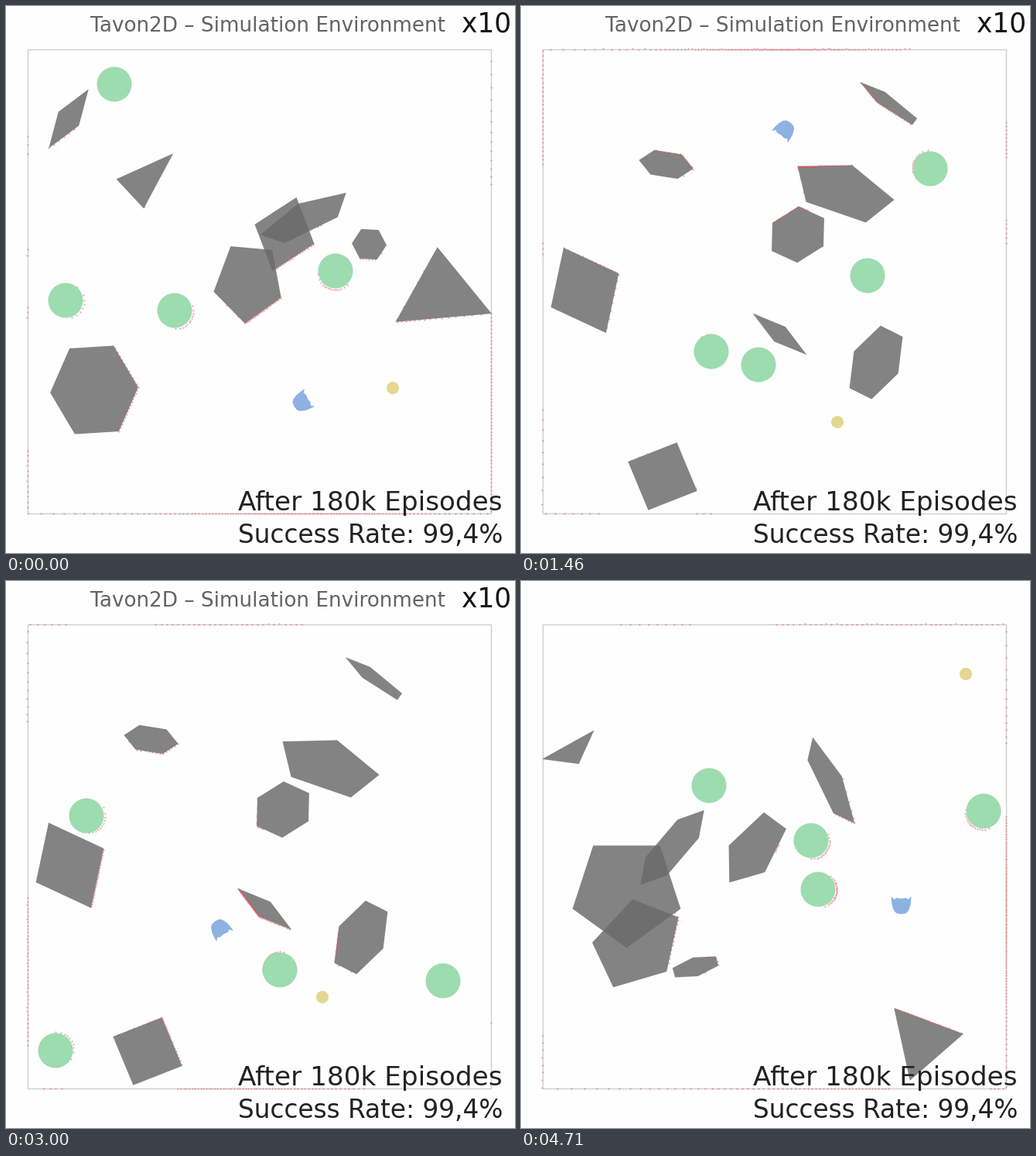
A matplotlib script that plays this animation: 658 by 706 pixels, repeating every 4750 ms.

```python
import numpy as np
import matplotlib.pyplot as plt
from matplotlib.animation import FuncAnimation
from matplotlib.collections import PolyCollection
from matplotlib.patches import Circle, Polygon, Rectangle

W, H, DPI = 658, 706, 64
PX = 72 / DPI                  # points per pixel
FRAMES, STEP = 190, 25         # 4750 ms
LEFT, TOP, RIGHT, BOTTOM = 27.5, 55.5, 627, 654.5
R = 22.5                       # radius of the moving discs
SPEED = 0.21                   # disc speed, px per ms
LAG = 8                        # the scanner sees the discs this late, ms
TITLE_END = 4670


def rotate(points, deg):
    c, s = np.cos(np.radians(deg)), np.sin(np.radians(deg))
    return points @ np.array([(c, s), (-s, c)])


def ngon(n, x, y, a, b, tilt):
    """Regular n-gon stretched to half-axes a and b, then turned."""
    k = 2 * np.pi * np.arange(n) / n
    return rotate(np.stack([a * np.cos(k), b * np.sin(k)], axis=1), tilt) + (x, y)


def robot_pose(path, t):
    path = np.array(path, float)
    return [np.interp(t, path[:, 0], path[:, c]) for c in (1, 2, 3)]


def scene(start, goal, path, times, layouts, shapes):
    """path rows: time, x, y, heading; layouts: disc centres at each of times."""
    shapes = [ngon(*s) for s in shapes]
    walls = np.array([(LEFT, TOP), (RIGHT, TOP), (RIGHT, BOTTOM), (LEFT, BOTTOM)])
    segs = np.concatenate([np.stack([s, np.roll(s, -1, axis=0)], axis=1)
                           for s in shapes + [walls]])
    layouts = np.array(layouts, float)
    if len(times) == 1:        # discs drift straight away from the robot
        away = layouts[0] - robot_pose(path, times[0])[:2]
        away /= np.linalg.norm(away, axis=1, keepdims=True)
        times = [times[0], times[0] + 1000]
        layouts = np.stack([layouts[0], layouts[0] + 1000 * SPEED * away])
    return dict(start=start, goal=goal, path=path, times=times,
                layouts=layouts, shapes=shapes, segs=segs)


# Shapes: corners, centre x, centre y, two half-axes, tilt
SCENES = [
    scene(0, (500, 493),
          [(0, 383, 511, -30), (320, 492, 494, 0)],
          [0], [[(140, 101), (77, 380), (218, 393), (426, 342)]],
          [(4, 81, 145.5, 46, 16, -56), (3, 179, 225, 51, 30, -43),
           (4, 360, 294.5, 40.5, 50, 18), (5, 387, 274, 21, 65, -116),
           (5, 313.5, 356, 54, 46, 95), (6, 469.5, 307.5, 22.5, 22, 3),
           (3, 563, 372, 61, 72, -95), (6, 114, 495.5, 57, 64, -3.5)]),
    scene(320, (382, 282),
          [(320, 560, 440, -150), (700, 441, 366, -132), (990, 386, 288, -125)],
          [700], [[(603, 83), (374, 226), (457, 515), (545, 602)]],
          [(6, 326, 119, 14, 35, -93), (4, 139, 161, 34, 31.5, -75),
           (6, 123.5, 331, 36.5, 74.5, -11.5), (5, 90, 446, 19.5, 35.5, 175),
           (4, 127, 544.5, 52, 19, -57.5), (3, 219, 522.5, 51.5, 30, 102),
           (3, 486.5, 251.5, 47, 71.5, 99), (4, 515.5, 291, 73, 62, -66)]),
    scene(990, (409, 537),
          [(990, 200, 110, 60), (1450, 341, 160, 127), (2375, 301, 222, 118),
           (3000, 277, 449, 57), (3430, 403, 532, 35)],
          [1450, 2375, 3000],
          [[(529, 210), (448, 348), (246, 446), (307, 463)],
           [(602, 385), (237, 285), (418, 417), (148, 495)],
           [(565, 516), (104, 303), (354, 502), (64, 606)]],
          [(5, 477.5, 126.5, 48, 9, -144), (6, 187.5, 204.5, 35.5, 18.5, 9),
           (5, 416.5, 239, 35.5, 69.5, -71), (6, 358, 295, 40, 35, -32),
           (4, 82.5, 367, 61.5, 49, 63.5), (4, 334.5, 423.5, 44, 12, 37.5),
           (6, 459, 460, 32, 52, 26.5), (4, 183, 607, 47.5, 48.5, -67)]),
    scene(3430, (580, 499),
          [(3430, 370, 590, -25), (3750, 482, 541, -62), (3930, 520, 486, -35),
           (4090, 572, 497, 10)],
          [3750], [[(376, 170), (295, 311), (443, 289), (400, 509)]],
          [(4, 64.5, 197, 40.5, 8.5, -89), (3, 116.5, 213, 17, 56.5, -119.5),
           (6, 150.5, 220.5, 10.5, 43.5, -16), (6, 69.5, 267.5, 15, 21, -31),
           (3, 371.5, 334.5, 15.5, 69.5, 56), (4, 98, 564.5, 48.5, 30.5, 41.5),
           (4, 221, 562.5, 37, 16.5, 72), (5, 552.5, 534, 21, 29.5, 177.5)]),
    scene(4090, (575, 120),
          [(4090, 300, 590, -40), (4700, 491.5, 418, -90), (4750, 491.5, 404, -90)],
          [4700], [[(243, 264), (598, 297), (375, 335), (384, 398)]],
          [(3, 65.5, 219.5, 19, 44.5, 61), (5, 136.5, 400.5, 73, 73.5, 90),
           (5, 149.5, 468, 53, 65, 43), (6, 195.5, 344, 63.5, 21, -49.5),
           (5, 302, 345, 55, 30.5, 126.5), (5, 399.5, 259.5, 17, 65, -26),
           (6, 225.5, 498, 12.5, 33.5, -105), (3, 519, 593.5, 56, 53, -131)]),
]

# Robot outline, front towards +x; the other half is mirrored.
half = [(8, 0), (9, 6), (7, 9), (11, 13), (4, 12.5), (-2, 11.5), (-8, 9), (-11, 6), (-12, 0)]
BODY = np.array(half + [(x, -y) for x, y in half[-2:0:-1]])

RAYS = np.array([(np.cos(a), np.sin(a)) for a in np.radians(range(360))])


def fold(v, lo, hi):
    """Bounce v between lo and hi."""
    span = hi - lo
    return lo + span - abs((v - lo) % (2 * span) - span)


def disc_centres(sc, t):
    times, xy = sc["times"], sc["layouts"]
    i = int(np.clip(np.searchsorted(times, t, side="right") - 1, 0, len(times) - 2))
    k = (t - times[i]) / (times[i + 1] - times[i])
    xy = xy[i] + k * (xy[i + 1] - xy[i])
    return np.stack([fold(xy[:, 0], LEFT + R, RIGHT - R),
                     fold(xy[:, 1], TOP + R, BOTTOM - R)], axis=1)


def cross(a, b):
    return a[..., 0] * b[..., 1] - a[..., 1] * b[..., 0]


def scan(origin, segs, centres):
    """Nearest hit of every ray on an edge or a disc."""
    d = RAYS[:, None]
    p, s = segs[:, 0] - origin, segs[:, 1] - segs[:, 0]
    den = cross(d, s)
    den = np.where(abs(den) < 1e-9, 1e-9, den)
    dist, u = cross(p, s) / den, cross(p, d) / den
    dist = np.where((dist > 0) & (u >= 0) & (u <= 1), dist, np.inf)

    c = centres - origin
    along = RAYS @ c.T
    depth = R ** 2 - (c ** 2).sum(axis=1) + along ** 2
    near = along - np.sqrt(np.maximum(depth, 0))
    near = np.where((depth > 0) & (near > 0), near, np.inf)

    reach = np.hstack([dist, near]).min(axis=1)
    ok = np.isfinite(reach)
    return origin + RAYS[ok] * reach[ok, None]


def label(x, y, text, size, color, ha="left"):
    return ax.text(x, y, text, fontsize=size * PX, color=color, ha=ha,
                   va="baseline", family="DejaVu Sans", zorder=9)


fig = plt.figure(figsize=(W / DPI, H / DPI), dpi=DPI, facecolor="#fefefe")
ax = fig.add_axes([0, 0, 1, 1])
ax.set_xlim(0, W)
ax.set_ylim(H, 0)
ax.axis("off")

ax.add_patch(Rectangle((LEFT, TOP), RIGHT - LEFT, BOTTOM - TOP, fill=False,
                       ec="#cfcfcf", lw=1.4 * PX, zorder=1))
blocks = PolyCollection([], facecolors="#6b6b6b", edgecolors="none", alpha=0.84, zorder=2)
ax.add_collection(blocks)
goal = ax.add_patch(Circle((0, 0), 8, fc="#e5d792", ec="none", zorder=3))
hits, = ax.plot([], [], "s", ms=1.8 * PX, mec="none", mfc="#e0505a", alpha=0.6, zorder=4)
discs = [ax.add_patch(Circle((0, 0), R, fc="#9ddcae", ec="none", zorder=5)) for _ in range(4)]
robot = ax.add_patch(Polygon(BODY, closed=True, fc="#8db1e3", ec="none", zorder=6))

heading = [label(568, 33, "Tavon2D \u2013 Simulation Environment", 26.3, "#636363", "right"),
           label(589, 33, "x10", 34.5, "#141414")]
label(300.5, 651, "After 180k Episodes", 34.2, "#222222")
label(299.5, 693, "Success Rate: 99,4%", 32.7, "#222222")


def draw(i):
    t = i * STEP
    sc = [s for s in SCENES if s["start"] <= t][-1]
    blocks.set_verts(sc["shapes"])
    goal.center = sc["goal"]
    for disc, centre in zip(discs, disc_centres(sc, t)):
        disc.center = tuple(centre)

    x, y, deg = robot_pose(sc["path"], t)
    origin = np.array([x, y])
    robot.set_xy(rotate(BODY, deg) + origin)
    hits.set_data(*scan(origin, sc["segs"], disc_centres(sc, t - LAG)).T)

    for text in heading:
        text.set_visible(t < TITLE_END)
    return [blocks, goal, *discs, hits, robot, *heading]


anim = FuncAnimation(fig, draw, frames=FRAMES, interval=STEP, repeat=True, repeat_delay=0)
plt.show()
```
